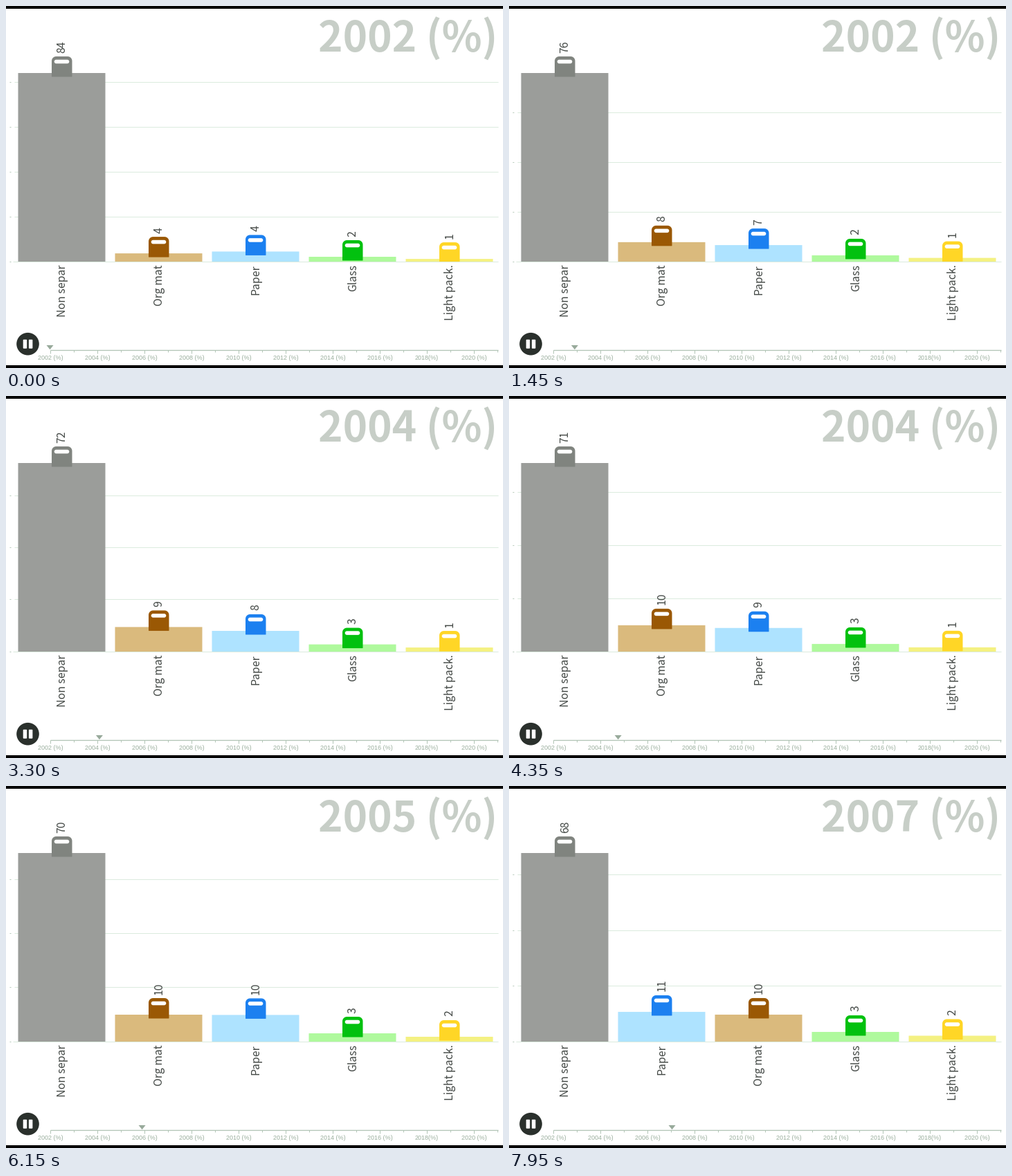
These frames come from a looping animation (718 px wide and 524 px high, 8 s). A matplotlib script:

```python
import numpy as np
import matplotlib.pyplot as plt
from matplotlib.animation import FuncAnimation
from matplotlib.patches import Circle, Polygon, Rectangle

W, H, DPI = 718, 524, 64
STEP_MS, LOOP_MS = 50, 8000
YEAR_MS, YEAR_PX = 1571, 34
BASE, TOP = 369.5, 97.0
BAR_W, SLOT_W, FIRST = 126, 140, 80.5
SANS = "Noto Sans CJK JP"
INK = "#444946"

# name, bar colour, can colour, yearly values from 2002
SERIES = [
    ("Non separ", "#9b9d9a", "#80847f", [84.0, 75.2, 72.6, 70.4, 69.6, 67.9, 66.5]),
    ("Org mat", "#daba7d", "#9a5804", [3.52, 8.05, 9.25, 9.95, 9.83, 9.6, 9.5]),
    ("Paper", "#aee3ff", "#1c80f0", [4.34, 6.7, 7.7, 9.1, 9.8, 10.55, 11.2]),
    ("Glass", "#aff99d", "#02c10f", [2.0, 2.42, 2.62, 2.8, 2.95, 3.35, 3.6]),
    ("Light pack.", "#f4f182", "#ffd626", [1.05, 1.38, 1.44, 1.49, 1.68, 1.98, 2.2]),
]
SWAPS = [(0, 1), (600, -1), (6340, 1)]
SWAP_MS = 450

fig = plt.figure(figsize=(W / DPI, H / DPI), dpi=DPI, facecolor="white")
ax = fig.add_axes([0, 0, 1, 1])
ax.set_xlim(0, W)
ax.set_ylim(H, 0)
ax.axis("off")


def pt(px):
    return px * 72 / DPI


def line(x0, y0, x1, y1, color, width=1.0, z=1):
    return ax.plot([x0, x1], [y0, y1], color=color, lw=pt(width), zorder=z,
                   solid_capstyle="butt")[0]


def label(x, y, s, px, color=INK, **kw):
    kw = {"family": SANS, "va": "baseline", "zorder": 6, **kw}
    return ax.text(x, y, s, fontsize=pt(px), color=color, **kw)


def round_box(x0, y0, x1, y1, r_top, r_bottom):
    corners = [(x0 + r_top, y0 + r_top, r_top, 180),
               (x1 - r_top, y0 + r_top, r_top, 270),
               (x1 - r_bottom, y1 - r_bottom, r_bottom, 0),
               (x0 + r_bottom, y1 - r_bottom, r_bottom, 90)]
    pts = []
    for cx, cy, r, start in corners:
        a = np.radians(np.linspace(start, start + 90, 8))
        pts += list(zip(cx + r * np.cos(a), cy + r * np.sin(a)))
    return np.array(pts)


def rect(x, y, w, h, color, z=2):
    return ax.add_patch(Rectangle((x, y), w, h, fc=color, lw=0, zorder=z,
                                  snap=False))


def shape(pts, color, z):
    return ax.add_patch(Polygon(pts, closed=True, fc=color, lw=0, zorder=z))


CAN = round_box(-14.5, -24, 15, 5.5, 6.5, 0.5)
SLOT = round_box(-10.8, -19.3, 10.8, -13.7, 2.8, 2.8)


class Bar:
    def __init__(self, name, fill, can, values):
        self.values = values
        self.bar = rect(0, 0, BAR_W, 1, fill)
        self.can = shape(CAN, can, 4)
        self.slot = shape(SLOT, "white", 5)
        clip = Rectangle((0, 0), W, BASE + 0.5, transform=ax.transData)
        self.can.set_clip_path(clip)
        turned = dict(rotation=90, rotation_mode="anchor")
        self.name = label(0, 374.3, name, 15.8, ha="right", **turned)
        self.count = label(0, 0, "", 15.8, ha="left", **turned)

    def value(self, year):
        return np.interp(year, range(len(self.values)), self.values)

    def place(self, slot, year, scale):
        v = self.value(year)
        cx = FIRST + SLOT_W * slot
        top = BASE - v * scale
        self.bar.set_bounds(cx - BAR_W / 2, top, BAR_W, BASE + 0.5 - top)
        self.can.set_xy(CAN + (cx, top))
        self.slot.set_xy(SLOT + (cx, top))
        self.name.set_x(cx + 5.2)
        self.count.set_position((cx + 5.2, top - 29.5))
        self.count.set_text(str(int(v + 0.5)))


# letterbox bands
rect(0, 0, W, 4, "black", 9)
rect(0, 520, W, 4, "black", 9)

# grid
GRID, TICK = "#dbebde", "#b4c8b8"
line(10, BASE, 711, BASE, GRID)
grid = [(v, line(12, 0, 711, 0, GRID), line(5, 0, 7, 0, TICK))
        for v in (20, 40, 60, 80)]
line(5, BASE, 7, BASE, TICK)

bars = [Bar(*row) for row in SERIES]
title = label(710, 67, "", 60.2, "#c7cec7", weight="bold", ha="right")

# pause button
ax.add_patch(Circle((31.5, 489.2), 16.3, fc="#2a302c", lw=0, zorder=3))
for x in (24.7, 32.9):
    shape(round_box(x, 482.8, x + 5.5, 495.8, 1, 1), "white", 4)

# timeline
AXIS = "#b2c5b6"
line(63.5, 497.5, 711, 497.5, AXIS, 1.3)
for i in range(20):
    x = 64 + YEAR_PX * i
    line(x, 497.5, x, 503 if i % 2 == 0 else 500.5, AXIS)
    if i % 2 == 0:
        text = f"{2002 + i}{'' if i == 16 else ' '}(%)"
        label(x, 512, text, 9, "#9cb09f", family="Liberation Sans", ha="center")
MARK = np.array([(-5, 491), (5, 491), (0, 497.3)])
marker = shape(MARK, "#98aa9b", 5)


def swap_amount(t):
    total = 0
    for start, sign in SWAPS:
        k = np.clip((t - start) / SWAP_MS, 0, 1)
        total += sign * k * k * (3 - 2 * k)
    return total


def draw(frame):
    t = frame * STEP_MS
    year = t / YEAR_MS
    peak = bars[0].value(year)
    scale = (BASE - TOP) / peak
    s = swap_amount(t)
    for bar, slot in zip(bars, (0, 1 + s, 2 - s, 3, 4)):
        bar.place(slot, year, scale)
    for v, rule, tick in grid:
        y = BASE - v * scale
        for item in (rule, tick):
            item.set_ydata([y, y])
            item.set_visible(v <= peak)
    title.set_text(f"{2002 + int(year)} (%)")
    marker.set_xy(MARK + (63.5 + YEAR_PX * year, 0))
    return []


anim = FuncAnimation(fig, draw, frames=LOOP_MS // STEP_MS, interval=STEP_MS,
                     init_func=lambda: draw(0), repeat=True, repeat_delay=0,
                     blit=False)
plt.show()
```
